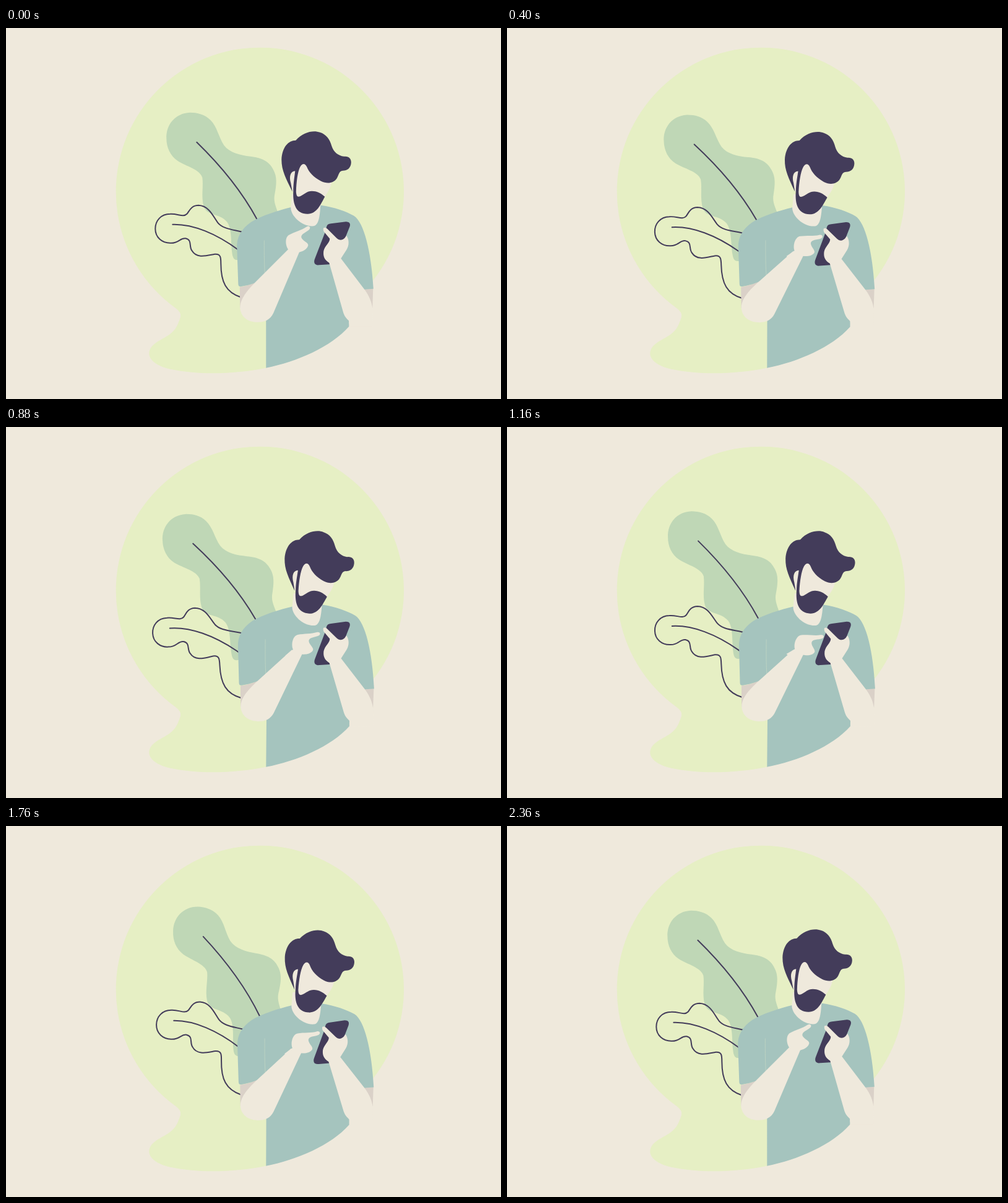
These frames come from a looping animation (800 by 600 pixels, 2400 ms). An HTML page with a canvas:

```html
<!DOCTYPE html>
<html lang="en">
<head>
<meta charset="utf-8">
<title>Man with phone</title>
<style>
  html, body { margin: 0; width: 100%; height: 100%; overflow: hidden; background: #efe9dc; }
  canvas { display: block; }
</style>
</head>
<body>
<canvas id="stage" width="800" height="600"></canvas>
<script>
const ctx = document.getElementById('stage').getContext('2d');
const LOOP = 2400;
const SKIN = '#efe9dc', LIME = '#e6efc4', LEAF = '#bfd7b6', SHIRT = '#a5c4be',
      INK = '#433c5a', SHADE = '#dad1c8';

const shapes = {
  backdrop: 'M592.5 408 A232.7 232.7 0 1 0 273.5 452 C284 460 283 465 279 474 C271 500 246 500 234 516 ' +
    'C224 532 240 545 265 551 C315 561 370 559 420 549 L520 500 L545 465 Z',
  bigLeaf: 'M440 300 C434 284 432 278 434 268 C437 252 438 240 432 229 C425 214 412 209 395 207 ' +
    'C378 205 361 201 352 189 C343 175 341 159 330 148 C321 139 309 136 297 136 ' +
    'C273 137 258 156 259 178 C259 192 265 206 277 214 C291 223 313 228 317 241 ' +
    'C319 255 315 271 319 287 C324 304 345 298 357 313 C365 324 363 345 365 362 ' +
    'C366 372 369 376 377 374 L420 360 Z',
  bigVein: 'M308 184 C345 220 380 262 405 308 L412 321',
  smallLeaf: 'M400 334 L381 329 C365 325 350 324 342 314 C334 303 328 287 311 286 ' +
    'C298 286 296 296 292 300 C286 306 277 299 265 300 C250 300 241 311 241 324 ' +
    'C241 338 252 347 265 347 C279 348 281 338 290 339.5 C301 342 295 352 300 359 ' +
    'C308 373 325 367 337 365 C347 364 347 371 347 380 C347 410 355 427 380 435 L395 438',
  smallVein: 'M269 317 C302 316 340 332 375 358 L390 370',
  torso: 'M461 289 C440 294 412 303 396 313 C380 324 372 338 373 355 L375 412 ' +
    'C375 417 377 418 381 417 C395 415 408 410 417 403 L420 420 L420 549 ' +
    'C470 539 525 515 554 482 L554 473 L562 440 L579 422 L593.5 421 ' +
    'C590 360 578 313 562 303 C550 296 530 289 509 286 Z',
  seam: 'M417 343 C417 365 417 385 418.5 401',
  leftShade: 'M377.5 418 C390 416 399 413 406 409 L400 440 L378 452 Z',
  rightShade: 'M575 421 L593 420.5 L592 452 Z',
  neck: 'M462 268 L460 290 C460 303 478 321 497 319.5 C506 318 507 300 508 286 L510 265 Z',
  face: 'M467 228 L490 210 L526 245 C526 256 520 264 515 272 L480 290 L463 263 C457 245 458 232 467 229 Z',
  hair: 'M468 181 C480 167 497 164 507 168 C517 171 523 179 526 190 C529 200 537 206 546 207 ' +
    'C553 206 558 210 557.5 217 C557 226 551 230 544 230 C537 231 538 237 534 243 ' +
    'C529 250 519 252 509 247 C497 241 489 232 486 224 C483 217 478 218 475 224 ' +
    'C471 232 469 248 468.5 264 C469 270 470 274 476 271 C482 268 486 263 494 263 ' +
    'C502 263 508 266 515 272 C508 285 502 300 487 300 C469 300 463 285 464 264 ' +
    'C464 250 466 240 467 230.5 C459 231 457 240 460 250 L462.5 264 ' +
    'C452 242 445 230 445 212 C446 192 456 181 468 181 Z',
  forearm: 'M456 357 L404 409 C385 428 378 440 378 452 C379 466 390 475 406 475 ' +
    'C418 475 427 471 432 460 L474 361 Z',
  hand: 'M457 359 C451 352 450 338 457 334 C466 329 478 326 485 321 C489 318 493 321 490 325 ' +
    'C485 330 476 332 477 338 C479 344 489 346 488 351 C486 358 478 361 473 362 L466 378 L448 372 Z',
  phone: 'M525 315.5 L549 312.5 C555 312.5 557 316 555 321 L549 336 L530 381 L506 382.5 ' +
    'C499 383.5 496 379 499 372 L516 328 L518 320 C519 317 521 316 525 315.5 Z',
  holdingArm: 'M512.5 325 C512 321 516 321 519 324 L534 339 C538 343 543 343 547 339 L550 335 ' +
    'C554 341 555 350 550 358 L541 372 L579 422 C587 433 591 443 592 453 L592 482 L556 482 ' +
    'C554 478 554 476 554 473 C550 469 547 466 545 460 L522 379 C514 374 512 368 513 360 ' +
    'C515 351 523 347 523 340 L513 328 Z'
};
for (const name in shapes) shapes[name] = new Path2D(shapes[name]);

// Keyframes are [time, value], joined by an ease in and out.
const tracks = {
  bigLeaf: [[0, 0], [560, -7], [760, -7], [1640, 11], [LOOP, 0]],
  smallLeaf: [[0, 0], [760, 8], [1760, -3], [LOOP, 0]],
  body: [[0, 0], [1000, .009], [LOOP, 0]],
  head: [[0, 0], [280, 2.6], [1160, 1.9], [1520, 4.8], [LOOP, 0]],
  arm: [[0, 0], [260, .065], [620, .035], [1140, .045], [1480, .045], [LOOP, 0]],
  hand: [[0, 0], [260, .4], [620, .13], [1140, .38], [1480, .38], [LOOP, 0]],
  phone: [[0, 0], [240, -.015], [1160, -.016], [1420, -.028], [LOOP, 0]]
};

function valueAt(keys, t) {
  const i = keys.findIndex(key => key[0] > t);
  const [t0, a] = keys[i - 1], [t1, b] = keys[i];
  return a + (b - a) * (1 - Math.cos(Math.PI * (t - t0) / (t1 - t0))) / 2;
}

function fill(name, color) {
  ctx.fillStyle = color;
  ctx.fill(shapes[name]);
}

function stroke(name, color = INK, width = 2) {
  ctx.strokeStyle = color;
  ctx.lineWidth = width;
  ctx.stroke(shapes[name]);
}

function turned(x, y, angle, paint) {
  ctx.save();
  ctx.translate(x, y);
  ctx.rotate(angle);
  ctx.translate(-x, -y);
  paint();
  ctx.restore();
}

function draw(t) {
  const at = name => valueAt(tracks[name], t);
  ctx.setTransform(1, 0, 0, 1, 0, 0);
  ctx.fillStyle = SKIN;
  ctx.fillRect(0, 0, 800, 600);
  ctx.translate(.3, .8);
  ctx.lineCap = 'round';
  fill('backdrop', LIME);

  turned(440, 405, at('bigLeaf') / 221, () => {
    fill('bigLeaf', LEAF);
    stroke('bigVein');
  });
  turned(440, 424, -at('smallLeaf') / 172, () => {
    stroke('smallLeaf');
    stroke('smallVein');
  });

  turned(420, 549, at('body'), () => {
    fill('leftShade', SHADE);
    fill('rightShade', SHADE);
    fill('torso', SHIRT);
    stroke('seam', 'rgba(215,228,200,.55)', .8);
    fill('neck', SKIN);
    turned(470, 342, at('head') / 127, () => {
      fill('face', SKIN);
      fill('hair', INK);
    });
    turned(570, 455, at('phone'), () => {
      fill('phone', INK);
      fill('holdingArm', SKIN);
    });
    turned(400, 455, at('arm'), () => {
      fill('forearm', SKIN);
      turned(468, 362, at('hand'), () => fill('hand', SKIN));
    });
  });
}

const start = performance.now();
function frame() {
  draw((performance.now() - start) % LOOP);
  requestAnimationFrame(frame);
}
frame();
</script>
</body>
</html>
```
